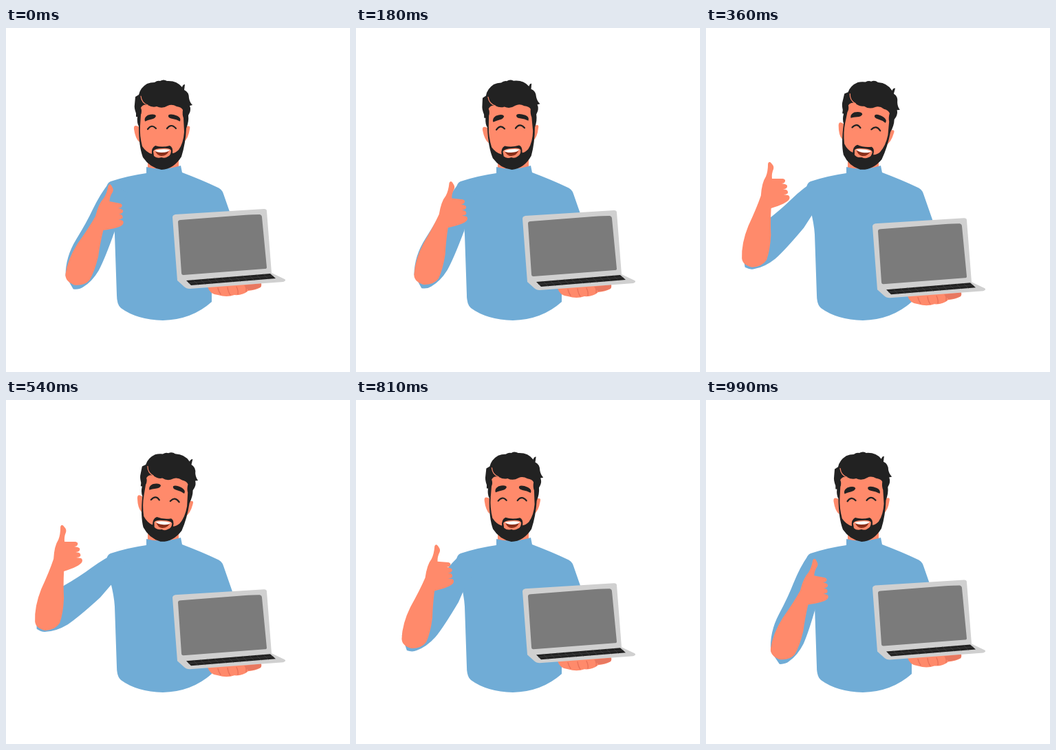
Animation of 500 by 500 pixels, one loop 1080 ms. Source, as an HTML page:

```html
<!DOCTYPE html>
<html lang="en">
<head>
<meta charset="utf-8">
<title>Thumbs up</title>
<style>
html, body { margin: 0; height: 100%; overflow: hidden; background: #fff; }
svg { display: block; width: 100vw; height: 100vh; }
.skin { fill: #ff8a6b; }
.blue { fill: #70acd6; }
.dark { fill: #222; }
.line { fill: none; stroke-linecap: round; stroke-linejoin: round; }
</style>
</head>
<body>
<svg viewBox="0 0 500 500">
  <!-- neck and torso -->
  <path class="skin" d="M206 180H251V206H206Z"/>
  <path class="blue" d="M204 202Q228 208 254 200L256 210Q285 221 306 231Q314 234 316 241L332 287L299 340V398Q270 424 228 425Q190 424 167 407Q161 402 161 388L158 300Q157 284 152 265L146 232Q147 225 152 223Q176 215 204 211Z"/>

  <!-- raised arm; the sleeve hangs down from its shoulder at 0,0 -->
  <path id="sleeve" class="blue" d="M-25-15Q-29 5-28 31Q-27 50-29 80Q-31 110-18 134L1 146Q9 143 12 137Q20 124 21 105Q21 85 15 44L9 22L5-15Z"/>
  <path id="forearm" class="skin" d="M79 184Q81 179 85 185Q88 188 87 192Q84 199 85 206H101Q105 207 104 210Q103 213 99 213L104 214Q108 215 107 218Q106 221 101 221L106 222Q109 224 108 227Q106 229 102 229L109 230Q112 232 110 236Q106 242 84 249Q83 270 84 288Q83 310 78 324Q72 334 57 335Q43 332 42 322Q41 300 51 275Q63 249 69 231Q70 212 76 203Q79 196 79 184Z"/>

  <g id="head">
    <path class="skin" d="M194 144Q185 139 186 147Q188 161 194 166ZM260 144Q269 140 267 147Q265 161 258 166Z"/>
    <path class="dark" d="M189 129L189 124Q186 116 187 111L188 100L193 97Q195 87 205 81Q210 79 216 79Q220 76 224 77Q229 74 234 77Q248 76 256 86Q257 82 260 82L259 90Q266 93 266 102Q267 108 271 112L267 113Q269 118 267 123L265 127Q266 136 262 146Q261 168 255 187Q244 205 226 206Q209 203 199 188Q193 172 193 143Q190 138 191 129Z"/>
    <path class="skin" d="M196 126Q198 121 196 116Q199 110 206 112Q213 116 219 114Q227 118 235 113Q241 110 248 114Q255 115 257 119Q256 126 258 131L259 151Q258 167 251 177Q246 182 242 182Q243 173 238 171Q227 174 217 171Q211 174 212 183Q204 181 198 172Q194 156 195 142Z"/>
    <path class="line" stroke="#ff8a6b" stroke-width="1.2" d="M196 99Q197 109 206 112"/>
    <path class="skin" d="M214 179Q216 175 227 175Q238 174 240 178Q240 185 235 187Q231 190 226 188Q219 190 215 186Z"/>
    <path fill="#8a2f1a" d="M217 179Q227 181 237 178Q234 186 226 186Q220 186 217 179Z"/>
    <path fill="#fff" d="M216 178Q227 175 238 177Q236 181 226 181Q219 181 216 178Z"/>
    <path id="brows" class="dark" d="M202 136Q200 131 206 127Q216 124 218 128Q217 132 211 133Q206 134 202 136ZM253 136Q255 131 249 128Q239 124 236 127Q235 131 241 132Q248 133 253 136Z"/>
    <path class="line" stroke="#222" stroke-width="2.2" d="M206 147Q212 139 218 146M234 146Q240 138 247 146"/>
  </g>

  <g id="laptop">
    <path class="skin" d="M293 376Q296 387 308 388Q321 392 332 388Q344 389 352 382Q363 381 370 377Q372 374 370 370Z"/>
    <path class="line" stroke="#e87058" stroke-width="1.3" d="M308 378Q309 383 312 387M322 377Q323 384 326 388M335 376Q338 382 337 387M348 375Q350 379 349 383"/>
    <path fill="#e87860" d="M346 374L371 371Q372 376 369 377Q360 381 352 381Z"/>
    <path fill="#d0d0d0" d="M242 275Q242 272 246 271L375 263Q379 263 379 266L386 356L405 365Q408 367 403 369L267 379Q262 379 259 376L249 367Z"/>
    <path fill="#7b7b7b" d="M250 282Q250 279 254 279L345 272Q360 271 369 271Q372 272 372 275L379 348Q379 350 376 350L258 359Q255 359 255 356Z"/>
    <path class="dark" d="M262 367L384 357L392 364L269 374Z"/>
    <path id="keys" class="line" stroke="#444" stroke-width=".7"/>
  </g>
</svg>
<script>
const STEP = 90, FRAMES = 12;
const shoulder = [165, 250], elbow = [63, 319], upperArm = 123;

// evenly spaced key values around the loop
const swing = [27.8, 28.9, 48.3, 55.9, 54.6, 24];
const bend = [10.8, 6, .4, 0, .8, 8.5];
const tilt = [0, -2.5, 8, 6, 3.2, -1];
const drop = [0, 2, 13.3, 12.3, 8.8, -1.5];

// closed Catmull-Rom spline, u in 0..1
function spline(keys, u) {
  const n = keys.length, i = Math.floor(u * n), f = u * n - i;
  const [a, b, c, d] = [-1, 0, 1, 2].map(k => keys[(i + k + n) % n]);
  return b + f / 2 * (c - a + f * (2 * a - 5 * b + 4 * c - d + f * (3 * (b - c) + d - a)));
}

const el = id => document.getElementById(id);
const move = (id, t) => el(id).setAttribute('transform', t);

let keys = 'M265.5 370.5L388 360.5';
for (let i = 1; i < 12; i++) keys += `M${262 + i * 10.2} ${367 - i * .83}l7 7`;
el('keys').setAttribute('d', keys);

function draw(now) {
  const u = Math.floor(now / STEP) % FRAMES / FRAMES;
  const angle = spline(swing, u), rad = angle * Math.PI / 180;
  const x = shoulder[0] - upperArm * Math.sin(rad) - elbow[0];
  const y = shoulder[1] + upperArm * Math.cos(rad) - elbow[1];
  move('sleeve', `translate(${shoulder}) rotate(${angle})`);
  move('forearm', `translate(${x} ${y}) rotate(${spline(bend, u)} ${elbow})`);
  move('head', `rotate(${spline(tilt, u)} 227 192)`);
  move('brows', `translate(0 ${(26 - angle) / 10})`);
  move('laptop', `translate(0 ${spline(drop, u)})`);
}

const start = performance.now();
function tick() {
  draw(performance.now() - start);
  requestAnimationFrame(tick);
}
tick();
</script>
</body>
</html>
```
